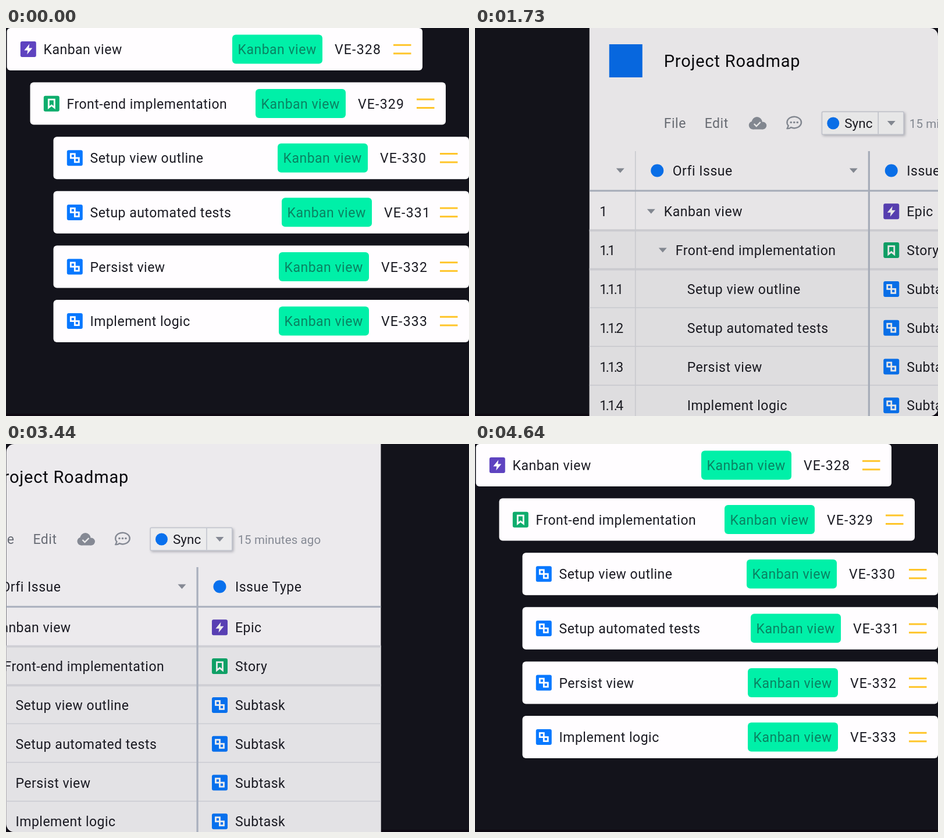
An HTML page with a canvas that plays this animation: 796x668 px, repeating every 4670 ms.

```html
<!DOCTYPE html>
<html lang="en">
<head>
<meta charset="utf-8">
<title>Board and roadmap</title>
<style>
  html, body { margin: 0; width: 100%; height: 100%; overflow: hidden; background: #13131b; }
  canvas { display: block; }
</style>
</head>
<body>
<canvas id="stage" width="796" height="668"></canvas>
<script>
const W = 796, H = 668, LOOP = 4670;
const TRAVEL = 1960; // slide distance over which a view fades out fully
const ctx = document.getElementById('stage').getContext('2d');

const color = {
  bg: '#13131b', edge: '#0f0a13', card: '#fffdff', ink: '#1b1b23',
  green: '#00f0a8', chipInk: '#0a8262', yellow: '#ffc529', blue: '#0878ff',
  grey: '#8f949e', menu: '#71757e', line: '#dcdde3', rule: '#b6bdcb', shade: '#f5f4f6'
};

const issues = [
  { type: 'Epic', title: 'Kanban view', no: '1', level: 0, chip: 387.5 },
  { type: 'Story', title: 'Front-end implementation', no: '1.1', level: 1, chip: 387.5 },
  { type: 'Subtask', title: 'Setup view outline', no: '1.1.1', level: 2, chip: 385.5 },
  { type: 'Subtask', title: 'Setup automated tests', no: '1.1.2', level: 2, chip: 392.5 },
  { type: 'Subtask', title: 'Persist view', no: '1.1.3', level: 2, chip: 387.5 },
  { type: 'Subtask', title: 'Implement logic', no: '1.1.4', level: 2, chip: 387.5 }
];

function text(str, x, y, fill = color.ink, size = 23, spacing = 0.5) {
  ctx.font = `${size}px Roboto, sans-serif`;
  ctx.letterSpacing = spacing + 'px';
  ctx.fillStyle = fill;
  ctx.fillText(str, x, y);
}

function rect(x, y, w, h, fill) {
  ctx.fillStyle = fill;
  ctx.fillRect(x, y, w, h);
}

function box(x, y, w, h, r, fill) {
  ctx.beginPath();
  ctx.roundRect(x, y, w, h, r);
  ctx.fillStyle = fill;
  ctx.fill();
}

function polygon(points) {
  ctx.beginPath();
  points.forEach(([x, y]) => ctx.lineTo(x, y));
  ctx.closePath();
}

function dot(x, y, r, fill) {
  ctx.beginPath();
  ctx.arc(x, y, r, 0, Math.PI * 2);
  ctx.fillStyle = fill;
  ctx.fill();
}

function arrow(x, y) {
  polygon([[x - 7, y - 4], [x + 7, y - 4], [x, y + 4]]);
  ctx.fillStyle = color.grey;
  ctx.fill();
}

function typeIcon(type, cx, cy) {
  const fill = { Epic: '#5e43c0', Story: '#0fad6d', Subtask: color.blue }[type];
  ctx.save();
  ctx.translate(cx, cy);
  box(-13.5, -13.5, 27, 27, 3, fill);
  ctx.fillStyle = ctx.strokeStyle = '#fff';
  if (type === 'Epic') {
    polygon([[2, -9], [-7, 2], [-1, 2], [-2, 9], [7, -2], [1, -2]]);
    ctx.fill();
  } else if (type === 'Story') {
    ctx.lineWidth = 2.8;
    polygon([[-5, -7], [5, -7], [5, 7], [0, 3], [-5, 7]]);
    ctx.stroke();
  } else {
    ctx.lineWidth = 2.8;
    ctx.strokeRect(-7, -7, 7, 7);
    ctx.strokeRect(0, 0, 7, 7);
  }
  ctx.restore();
}

function drawCards() {
  issues.forEach((issue, i) => {
    const x = 1.5 + issue.level * 40, y = i * 93.6, mid = y + 36.6;
    const chip = x + issue.chip;
    box(x, y, 714.5, 73, 6, color.card);
    typeIcon(issue.type, x + 36.8, mid);
    text(issue.title, x + 63, mid + 8.5);
    box(chip, y + 11.5, 155, 50, 6, color.green);
    text('Kanban view', chip + 9.5, mid + 8.5, color.chipInk);
    text('VE-' + (328 + i), chip + 176, mid + 8.5, color.ink, 23, 1.2);
    rect(x + 664.5, mid - 8.8, 30.5, 3, color.yellow);
    rect(x + 664.5, mid + 5.8, 30.5, 3, color.yellow);
  });
}

function cloud(x, y) {
  dot(x - 8, y + 3.5, 7, color.grey);
  dot(x - 1, y - 2, 9, color.grey);
  dot(x + 9, y + 4, 6.5, color.grey);
  rect(x - 8, y + 1, 17, 9.5, color.grey);
  ctx.strokeStyle = '#fff';
  ctx.lineWidth = 2.4;
  ctx.beginPath();
  ctx.moveTo(x - 6, y + 1);
  ctx.lineTo(x - 2, y + 5);
  ctx.lineTo(x + 5, y - 2);
  ctx.stroke();
}

function bubble(x, y) {
  ctx.strokeStyle = color.grey;
  ctx.lineWidth = 2.4;
  ctx.beginPath();
  ctx.ellipse(x, y, 12.3, 9.8, 0, Math.PI * 0.8, Math.PI * 2.65);
  ctx.quadraticCurveTo(x - 8, y + 11, x - 12, y + 10.5);
  ctx.closePath();
  ctx.stroke();
  for (const dx of [-5.5, 0, 5.5]) dot(x + dx, y, 1.8, color.grey);
}

function syncButton() {
  ctx.save();
  ctx.shadowColor = 'rgba(40, 45, 65, .3)';
  ctx.shadowBlur = 4;
  ctx.shadowOffsetX = ctx.shadowOffsetY = 2;
  box(399, 143.5, 142, 40.5, 2, '#d2d5de');
  ctx.restore();
  box(400.5, 145, 139, 37.5, 1, '#fff');
  rect(495.7, 145, 1.6, 37.5, '#d2d5de');
  dot(419, 164, 10.5, color.blue);
  text('Sync', 438.5, 172, color.ink, 22.5, 0);
  arrow(519, 164);
}

function drawTable() {
  rect(0, 0, W, H, color.card);
  rect(0, 348, W, H - 348, color.shade);

  rect(34, 28, 57, 57, '#0670f5');
  text('Project Roadmap', 128, 67, '#08080c', 29, 0.8);
  text('File', 128, 172, color.menu);
  text('Edit', 198, 172, color.menu);
  cloud(289, 164);
  bubble(352, 162.5);
  syncButton();
  text('15 minutes ago', 550, 172, color.grey, 20.5, 0.1);

  for (const y of [348, 415]) rect(0, y - 1.5, W, 4, '#e2e2e7');
  for (const y of [348, 415, 481.5, 548.2, 615]) rect(0, y - 0.8, W, 1.6, color.line);
  rect(78.2, 212, 1.6, H, color.line);
  rect(0, 278.7, W, 3, color.rule);
  rect(479, 212, 3.2, H, color.rule);

  arrow(53, 245.5);
  dot(116.5, 245.5, 11, color.blue);
  text('Orfi Issue', 143, 254);
  arrow(454, 245.5);
  dot(519, 245.5, 11, color.blue);
  text('Issue Type', 545.5, 254);

  issues.forEach((issue, i) => {
    const mid = 315.8 + i * 66.8, indent = issue.level * 20;
    text(issue.no, 17.5, mid + 8.5, color.ink, 23, -2.5);
    if (issue.level < 2) arrow(106 + indent, mid);
    text(issue.title, 128 + indent, mid + 8.5);
    typeIcon(issue.type, 519, mid);
    text(issue.type, 545.5, mid + 8.5);
  });
}

// cubic-bezier(.25, .1, .25, 1)
function ease(x) {
  if (x <= 0) return 0;
  if (x >= 1) return 1;
  const curve = (a, b, s) => 3 * a * s * (1 - s) ** 2 + 3 * b * s * s * (1 - s) + s ** 3;
  let lo = 0, hi = 1;
  for (let i = 0; i < 24; i++) {
    const s = (lo + hi) / 2;
    if (curve(0.25, 0.25, s) < x) lo = s; else hi = s;
  }
  return curve(0.1, 1, lo);
}

const slide = (t, start, duration) => ease((t - start) / duration);

function show(draw, shift, clipX, radius) {
  if (Math.abs(shift) >= W) return;
  ctx.save();
  ctx.beginPath();
  ctx.roundRect(clipX, 0, W - clipX, H, radius);
  ctx.clip();
  ctx.translate(shift, 0);
  draw();
  ctx.restore();
  ctx.globalAlpha = Math.abs(shift) / TRAVEL;
  rect(0, 0, W, H, color.bg);
  ctx.globalAlpha = 1;
}

function render(t) {
  rect(0, 0, W, H, color.bg);
  rect(0, H - 4, W, 4, color.edge);
  if (t < 1300) show(drawCards, -TRAVEL * slide(t, 1024, 840), 1, 0);
  else if (t < 3366) show(drawTable, TRAVEL * (1 - slide(t, 1182.5, 880)), 0.5, 14);
  else if (t < 3600) show(drawTable, -TRAVEL * slide(t, 3366, 840), 0.5, 14);
  else show(drawCards, TRAVEL * (1 - slide(t, 3508, 720)), 1, 0);
}

// The motion advances in 30 ms steps; the second half runs 20 ms off the first.
function step(t) {
  const phase = t < 1280 ? 0 : 20;
  return Math.floor((t - phase) / 30) * 30 + phase;
}

const begin = performance.now();
function frame() {
  render(step((performance.now() - begin) % LOOP));
  requestAnimationFrame(frame);
}
frame();
</script>
</body>
</html>
```
